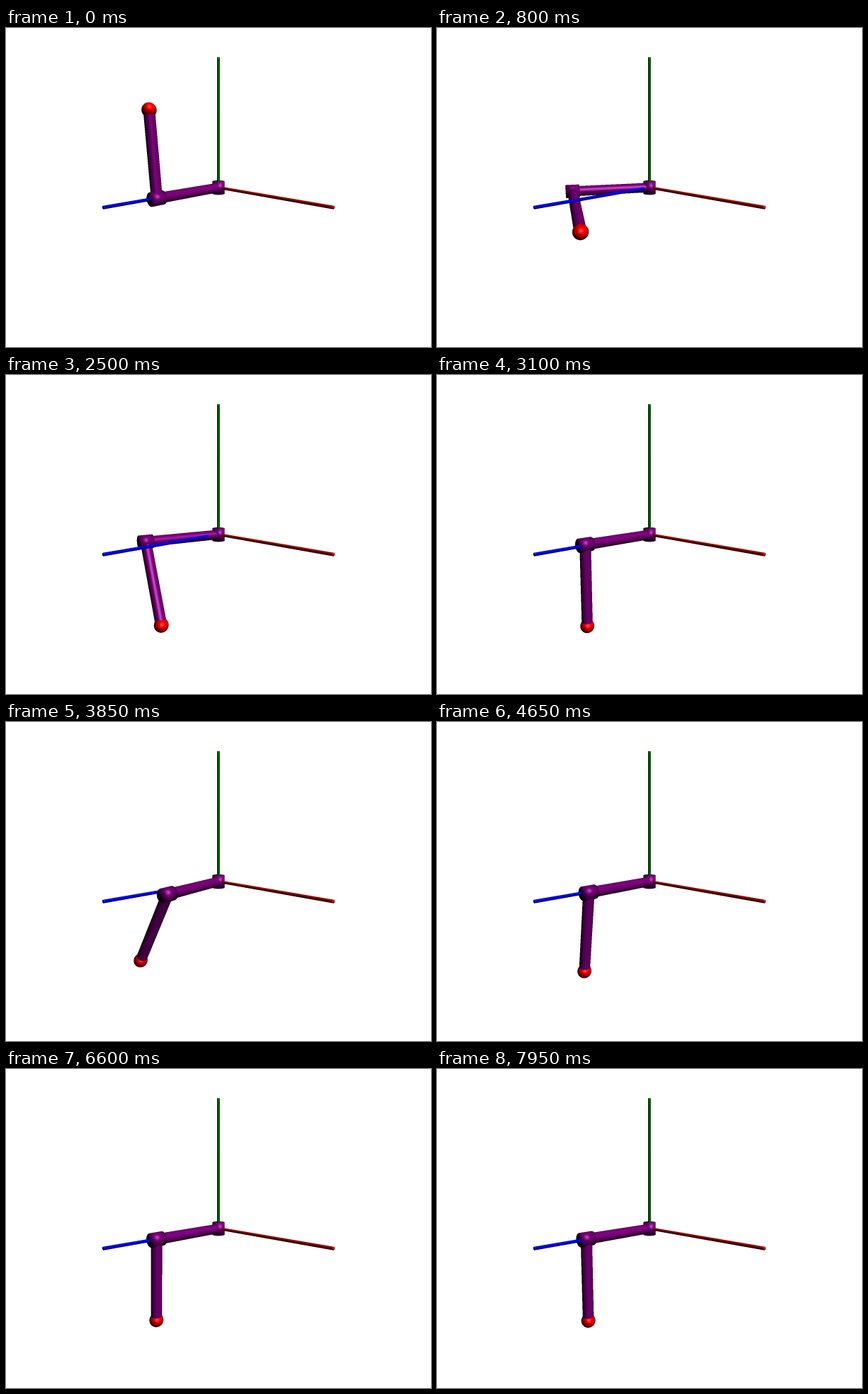
Animation, 600 px wide and 450 px high, one loop 8 s. Source, as a matplotlib script:

```python
import numpy as np
import matplotlib.pyplot as plt
from matplotlib.animation import FuncAnimation

W, H, SS = 600, 450, 3
FRAMES, STEP = 160, 50
FOCAL, DIST, TILT = 512.0, 2.92, np.radians(10)
ARM, ROD = 0.607, 0.599
PURPLE, RED, GREEN, BLUE = (.5, 0, .5), (1, 0, 0), (0, .5, 0), (0, 0, 1)

LIGHT = np.array([.45, .5, .74])
LIGHT /= np.linalg.norm(LIGHT)
HALF = LIGHT + [0, 0, 1]
HALF /= np.linalg.norm(HALF)
EYE = np.array([0, 0, DIST])

# Swing of the rod from the hanging position: time in s, angle in degrees
SWING = np.array([
    (0, -174.5), (.15, -171), (.3, -157), (.4, -134), (.5, -96), (.6, -48),
    (.7, 18), (.8, 75.5), (.9, 98), (1.03, 108), (1.73, -88), (2.3, 62),
    (2.825, -48), (3.34, 38), (3.84, -28), (4.34, 25), (4.83, -22),
    (5.33, 19), (5.83, -16.5), (6.324, 15.5), (6.8, -14.5), (7.26, 13.5),
    (7.72, -12.5), (8.19, 12)])
# Slow drift of the arm's mean heading
DRIFT_T = (0, .8, 1.85, 3.1, 4.65, 6.6, 8)
DRIFT = (43, 40.8, 42.4, 42.5, 43, 44, 43.8)
COUPLE, INERTIA = 0.5, 0.4


def key_slopes(t, v):
    """Monotone slopes: zero at every turning point."""
    d = np.diff(v) / np.diff(t)
    m = np.zeros_like(v)
    a, b = d[:-1], d[1:]
    same = a * b > 0
    m[1:-1][same] = 2 * a[same] * b[same] / (a[same] + b[same])
    return m


KEY_T, KEY_V = SWING.T
KEY_M = key_slopes(KEY_T, KEY_V)


def swing_angle(t):
    i = min(np.searchsorted(KEY_T, t, side="right") - 1, len(KEY_T) - 2)
    h = KEY_T[i + 1] - KEY_T[i]
    u = (t - KEY_T[i]) / h
    v0, v1, m0, m1 = KEY_V[i], KEY_V[i + 1], KEY_M[i] * h, KEY_M[i + 1] * h
    s = u * u * (3 - 2 * u)
    return np.radians(v0 + (v1 - v0) * s
                      + m0 * u * (1 - u) ** 2 - m1 * u * u * (1 - u))


def arm_angle(t, beta):
    """Heading that keeps the angular momentum about the post at zero."""
    root = np.sqrt(INERTIA)
    return (np.radians(np.interp(t, DRIFT_T, DRIFT))
            - COUPLE / root * np.arctan(root * np.sin(beta)))


def view(right, up, near):
    """Turntable coordinates to camera coordinates."""
    c, s = np.cos(TILT), np.sin(TILT)
    return np.array([right, up * c - near * s, near * c + up * s])


# One ray per subpixel; distance along a ray equals depth
gx = ((np.arange(W * SS) + .5) / SS - W / 2) / FOCAL
gy = (H / 2 - (np.arange(H * SS) + .5) / SS) / FOCAL
RAYS = np.empty((H * SS, W * SS, 3), np.float32)
RAYS[..., 0] = gx
RAYS[..., 1] = gy[:, None]
RAYS[..., 2] = -1
color = np.ones((H * SS, W * SS, 3), np.float32)
depth = np.full((H * SS, W * SS), np.inf, np.float32)


def box(points, r):
    """Slice of the buffers that covers the points with radius r."""
    p = np.array(points)
    z = DIST - p[:, 2]
    pad = 1.5 * FOCAL * r / z.min() + 2
    x = W / 2 + FOCAL * p[:, 0] / z
    y = H / 2 - FOCAL * p[:, 1] / z
    lo_x, hi_x = max(x.min() - pad, 0), min(x.max() + pad, W)
    lo_y, hi_y = max(y.min() - pad, 0), min(y.max() + pad, H)
    return (slice(int(lo_y * SS), int(hi_y * SS)),
            slice(int(lo_x * SS), int(hi_x * SS)))


def shade(area, hit, t, normal, rgb):
    n = normal / np.linalg.norm(normal, axis=1, keepdims=True)
    diffuse = .12 + .88 * np.clip(n @ LIGHT, 0, 1)
    gloss = .3 * np.clip(n @ HALF, 0, 1) ** 30
    color[area][hit] = np.clip(diffuse[:, None] * rgb + gloss[:, None], 0, 1)
    depth[area][hit] = t


def cylinder(a, b, r, rgb, power=99):
    """Capped cylinder; a low power rounds the shading at its ends."""
    area = box([a, b], r)
    d = RAYS[area]
    length = np.linalg.norm(b - a)
    axis = (b - a) / length
    oc = EYE - a
    da = d @ axis + 1e-9
    oa = oc @ axis
    qa = (d * d).sum(-1) - da * da
    qb = d @ oc - da * oa
    disc = qb * qb - qa * (oc @ oc - oa * oa - r * r)
    root = np.sqrt(np.maximum(disc, 0))
    c0, c1 = -oa / da, (length - oa) / da
    enter = np.maximum((-qb - root) / qa, np.minimum(c0, c1))
    leave = np.minimum((-qb + root) / qa, np.maximum(c0, c1))
    hit = (disc > 0) & (enter < leave) & (enter < depth[area])
    if not hit.any():
        return
    t = enter[hit]
    p = oc + t[:, None] * d[hit]
    z = p @ axis
    radial = p - z[:, None] * axis
    end = np.clip(2 * z / length - 1, -1, 1) ** power
    shade(area, hit, t, radial / r + end[:, None] * axis, np.array(rgb))


def sphere(c, r, rgb):
    area = box([c], r)
    d = RAYS[area]
    oc = EYE - c
    qa = (d * d).sum(-1)
    qb = d @ oc
    disc = qb * qb - qa * (oc @ oc - r * r)
    t = (-qb - np.sqrt(np.maximum(disc, 0))) / qa
    hit = (disc > 0) & (t < depth[area])
    if hit.any():
        t = t[hit]
        shade(area, hit, t, oc + t[:, None] * d[hit], np.array(rgb))


# Fixed parts
ORIGIN = np.zeros(3)
q = np.sqrt(.5)
cylinder(ORIGIN, view(0, 1, 0), .011, GREEN)
cylinder(ORIGIN, view(q, 0, q), .011, RED)
cylinder(ORIGIN, view(-q, 0, q), .011, BLUE)
cylinder(view(0, -.05, 0), view(0, .05, 0), .05, PURPLE, 1)

X0, X1, Y0, Y1 = 120, 320, 90, 380
STAGE = (slice(Y0 * SS, Y1 * SS), slice(X0 * SS, X1 * SS))
base_color, base_depth = color[STAGE].copy(), depth[STAGE].copy()


def shrink(part):
    h, w = part.shape[0] // SS, part.shape[1] // SS
    small = sum(part[i::SS, j::SS] for i in range(SS) for j in range(SS))
    return (small.reshape(h, w, 3) * (255 / SS ** 2) + .5).astype(np.uint8)


picture = shrink(color)

fig = plt.figure(figsize=(W / 100, H / 100), dpi=100, facecolor="white")
ax = fig.add_axes([0, 0, 1, 1])
ax.axis("off")
screen = ax.imshow(picture, extent=(0, W, H, 0), interpolation="nearest",
                   aspect="auto")


def draw(i):
    t = i * STEP / 1000
    beta = swing_angle(t)
    psi = arm_angle(t, beta)
    out = np.array([-np.cos(psi), 0, np.sin(psi)])
    side = np.array([np.sin(psi), 0, np.cos(psi)])
    elbow = ARM * out
    tip = elbow + ROD * (np.sin(beta) * side - np.cos(beta) * np.array([0, 1, 0]))

    color[STAGE], depth[STAGE] = base_color, base_depth
    cylinder(ORIGIN, view(*elbow), .038, PURPLE)
    cylinder(view(*(elbow - .05 * out)), view(*(elbow + .05 * out)),
             .05, PURPLE, 1)
    cylinder(view(*elbow), view(*tip), .039, PURPLE)
    sphere(view(*tip), .05, RED)

    picture[Y0:Y1, X0:X1] = shrink(color[STAGE])
    screen.set_data(picture)
    return [screen]


anim = FuncAnimation(fig, draw, frames=FRAMES, interval=STEP, repeat=True,
                     repeat_delay=0)
plt.show()
```
